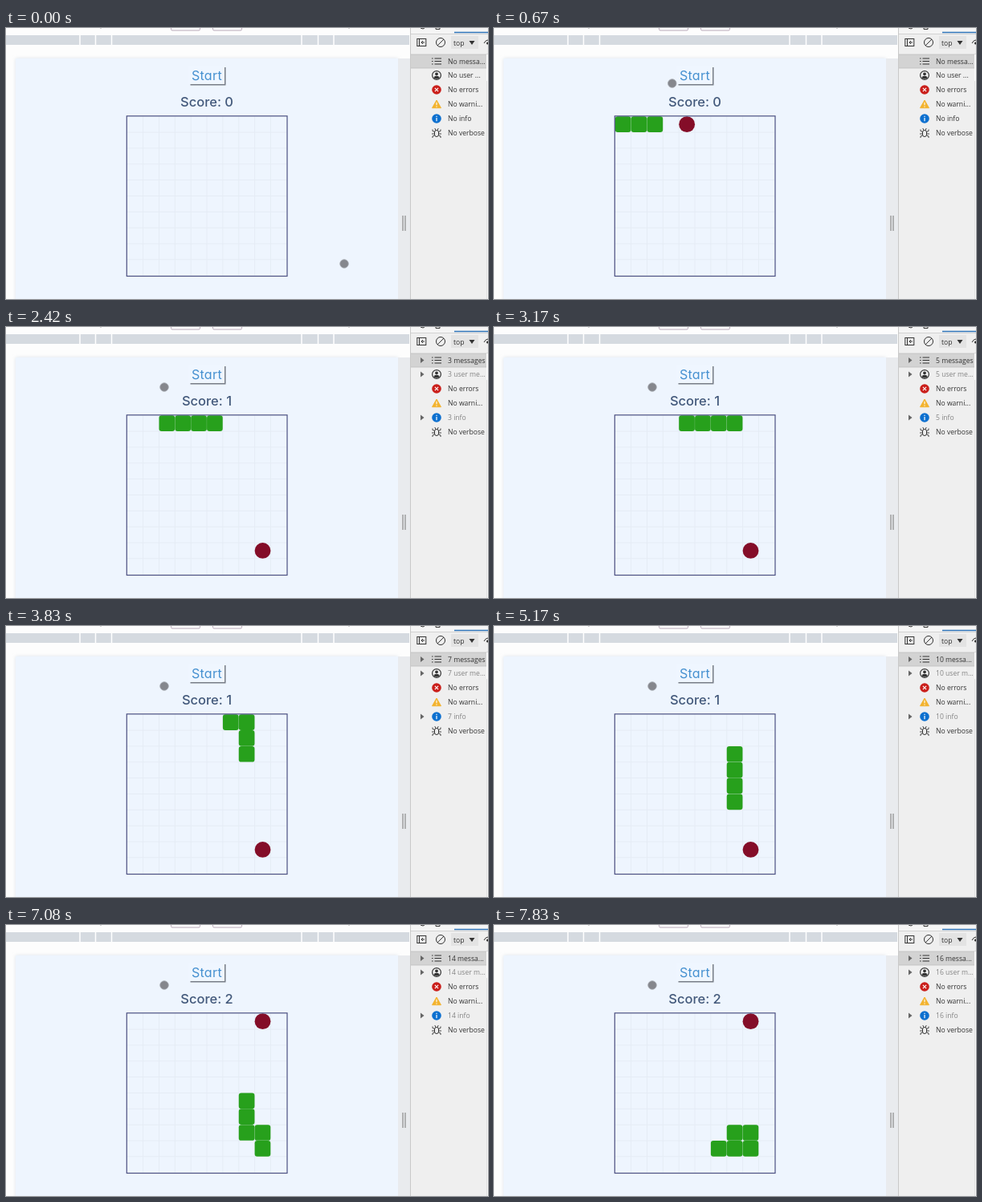
An HTML page for the animation above (8 s loop, 600x338 px).

```html
<!DOCTYPE html>
<html lang="en">
<head>
<meta charset="utf-8">
<title>Snake</title>
<style>
  html, body { margin: 0; width: 100%; height: 100%; overflow: hidden; background: #fff; }
  svg { display: block; width: 600px; height: 338px; }
  .game { font-family: Inter, "Open Sans", sans-serif; font-feature-settings: "cv11"; text-anchor: middle; }
  .panel { font: 8.6px "Open Sans", "Noto Sans", sans-serif; fill: #333; }
  .line { fill: none; stroke: #333; }
</style>
</head>
<body>
<svg viewBox="0 0 600 338">
  <defs>
    <filter id="soft" x="-10%" y="-10%" width="120%" height="120%"><feGaussianBlur stdDeviation="2"/></filter>
    <filter id="edge" x="-10%" y="-10%" width="120%" height="130%"><feGaussianBlur stdDeviation=".6"/></filter>
  </defs>

  <rect width="600" height="338" fill="#fdfdfd"/>
  <rect y="9" width="502" height="12" fill="#d5dae0"/>
  <path d="M92 9v12M111.5 9v12M131.5 9v12M368 9v12M388.500 9v12M408 9v12" stroke="#fff" stroke-width="1.5"/>
  <path d="M205.500 0v1.500q0 1.500 1.500 1.500h33q1.500 0 1.500-1.500v-1.500M257.500 0v1.500q0 1.500 1.500 1.500h33q1.500 0 1.500-1.500v-1.500" fill="none" stroke="#b9a9b9"/>
  <path d="M117 0h2M426 0h2" stroke="#aaa"/>

  <rect x="12" y="38" width="476" height="304" fill="#dde3ea" filter="url(#soft)"/>
  <rect x="12" y="38" width="476" height="300" fill="#eef5fe"/>
  <rect x="488" y="38" width="15" height="300" fill="#e9ebee"/>
  <path d="M494 234v19M497 234v19" stroke="#8b8b8b" stroke-width="1.2"/>

  <g class="game">
    <rect x="229.500" y="49" width="44" height="22.500" fill="#777d86" filter="url(#edge)"/>
    <rect x="227.500" y="47" width="44.500" height="23" fill="#eff6ff"/>
    <text x="250" y="64.500" font-size="16" letter-spacing=".3" fill="#4590d0">Start</text>
    <text id="score" x="250" y="98" font-size="16.500" font-weight="500" fill="#43597b"></text>
  </g>
  <path id="grid" fill="none" stroke="#e5ecf5"/>
  <g id="snake" fill="#27a01c"></g>
  <circle id="food" r="9.900" fill="#840d28"/>
  <rect x="150.300" y="109.800" width="199.700" height="199.700" fill="none" stroke="#4c5080" stroke-width="1.200"/>
  <circle id="cursor" r="5.300" fill="#85878d" stroke="#a5a9b0" stroke-width=".8"/>

  <g class="panel">
    <rect x="503" width="97" height="338" fill="#efefef"/>
    <path d="M503.500 0v338" stroke="#c9c9c9"/>
    <rect x="504" width="96" height="7" fill="#f5f5f5"/>
    <path d="M504 7.500h96" stroke="#d2d2d2"/>
    <path d="M558 5.500h42" stroke="#2f73b8" stroke-width="1.500"/>
    <path d="M516 0l3 1 2-1M535 0v1.500h5v-1.500" class="line"/>
    <rect x="504" y="33" width="94" height="17" fill="#d3d3d3"/>
    <path d="M504 33h96M504 50h94" stroke="#bdbdbd" stroke-width=".8"/>
    <rect x="598" y="33" width="2" height="305" fill="#fafafa"/>
    <path d="M598.500 66v272" stroke="#d5d5d5" stroke-width=".7"/>

    <rect x="511.800" y="13.500" width="11" height="9" class="line"/>
    <path d="M514.500 13.500v9M521 18h-4M519 16l-2 2 2 2" class="line"/>
    <circle cx="541" cy="18" r="5.500" class="line"/><path d="M537 22l8-8" class="line"/>
    <rect x="554" y="10" width="34" height="16" fill="#e3e3e3"/>
    <text x="557" y="21.500">top</text>
    <path d="M576.500 16h7l-3.500 5z"/>
    <path d="M595 19q2-4 5-4" class="line"/><circle cx="599.500" cy="19" r="1.500"/>

    <path d="M533.500 38h8.500M533.500 41.500h8.500M533.500 45h8.500" class="line"/>
    <path d="M530 38h1.500M530 41.500h1.500M530 45h1.500" class="line"/>
    <circle cx="536" cy="59" r="5.400" class="line" stroke-width="1.200"/>
    <circle cx="536" cy="57.300" r="1.900"/><path d="M532.500 62.500q0-2.700 3.500-2.700t3.500 2.700q-3.500 2-7 0z"/>
    <circle cx="536" cy="77" r="5.800" fill="#ca1f1b"/>
    <path d="M533.900 74.900l4.200 4.200M538.100 74.900l-4.200 4.200" stroke="#fff" stroke-width="1.200"/>
    <path d="M536 90l5.500 9.700h-11z" fill="#f3b32e" stroke="#f3b32e" stroke-linejoin="round"/>
    <path d="M536 92.800v3.500M536 97.500v1.200" stroke="#fff" stroke-width="1.100"/>
    <circle cx="536" cy="113" r="5.800" fill="#0d70cf"/>
    <path d="M536 109.700v1.300M536 112v4.300" stroke="#fff" stroke-width="1.200"/>
    <rect x="533.500" y="127.500" width="5" height="8" rx="2.500" class="line"/>
    <path d="M534.500 127.500v-1.500l-1-1M537.500 127.500v-1.500l1-1M533.500 129.500l-2.500-1v-2M538.500 129.500l2.500-1v-2M533 132h-3M539 132h3M533.500 134l-2.500 1v2M538.500 134l2.500 1v2" class="line" stroke-width=".9"/>

    <path id="arrows" d="M516 38l4.500 3.500-4.500 3.500zM516 55.500l4.500 3.500-4.500 3.500zM516 109.500l4.500 3.500-4.500 3.500z" fill="#666"/>
    <text id="messages" x="550" y="44.700"></text>
    <text id="user" x="550" y="62.300"></text>
    <text x="550" y="80.300">No errors</text>
    <text x="550" y="98.300">No warni...</text>
    <text id="info" x="550" y="116.300"></text>
    <text x="550" y="134.300">No verbose</text>
  </g>
</svg>
<script>
const LOOP = 8000, START = 500;
const CELL = 19.85, LEFT = 150.8, TOP = 110.2;
const TURNS = 'RRRRRDDDDDDDRDLL';
const STEP_TIMES = [1165, 1660, 2080, 2498, 2915, 3415, 3825, 4330, 4745, 5165, 5610, 6075, 6580, 6990, 7415, 7815];
const MEALS = [2, 14];
const FOODS = [[4, 0], [8, 8], [8, 0]];
const MOUSE = [[60, 421, 294], [160, 395, 250], [330, 275, 80], [410, 247, 60], [560, 244, 61], [670, 222, 69], [750, 205, 73], [830, 197, 75]];

const $ = id => document.getElementById(id);
const setText = (id, text) => { $(id).textContent = text; };

const trail = [[0, 0], [1, 0], [2, 0]];
for (const turn of TURNS) {
  const [x, y] = trail[trail.length - 1];
  const [dx, dy] = { R: [1, 0], D: [0, 1], L: [-1, 0] }[turn];
  trail.push([x + dx, y + dy]);
}

let gridPath = '';
for (let i = 1; i < 10; i++) {
  gridPath += `M${LEFT + i * CELL} ${TOP}v198.500M${LEFT} ${TOP + i * CELL}h198.500`;
}
$('grid').setAttribute('d', gridPath);

function mouseAt(t) {
  const next = MOUSE.findIndex(point => point[0] > t);
  if (next < 0) return MOUSE[MOUSE.length - 1].slice(1);
  if (next === 0) return MOUSE[0].slice(1);
  const [t0, x0, y0] = MOUSE[next - 1], [t1, x1, y1] = MOUSE[next];
  const k = (t - t0) / (t1 - t0);
  return [x0 + (x1 - x0) * k, y0 + (y1 - y0) * k];
}

function place(id, x, y) {
  $(id).setAttribute('cx', x);
  $(id).setAttribute('cy', y);
}

function showLog(count) {
  const wide = count > 9;
  setText('messages', !count ? 'No messa...' : wide ? `${count} messa...` : `${count} message${count > 1 ? 's' : ''}`);
  setText('user', !count ? 'No user ...' : `${count} user m${wide ? '' : 'e'}...`);
  setText('info', `${count || 'No'} info`);
  $('arrows').style.display = count ? '' : 'none';
  for (const id of ['user', 'info']) $(id).style.fill = count ? '#858585' : '#333';
}

function draw(t) {
  const steps = STEP_TIMES.filter(time => time <= t).length;
  const score = MEALS.filter(meal => meal <= steps).length;
  const playing = t >= START;
  const end = steps + 3;
  const body = playing ? trail.slice(end - 3 - score, end) : [];

  $('snake').innerHTML = body.map(([x, y]) =>
    `<rect x="${LEFT + x * CELL}" y="${TOP + y * CELL}" width="19.700" height="19.700" rx="3.200"/>`).join('');
  const [fx, fy] = FOODS[score];
  place('food', LEFT + (fx + 0.5) * CELL, TOP + (fy + 0.5) * CELL);
  $('food').style.display = playing ? '' : 'none';
  place('cursor', ...mouseAt(t));
  setText('score', `Score: ${score}`);
  showLog(steps);
}

function tick() {
  draw(performance.now() % LOOP);
  requestAnimationFrame(tick);
}
tick();
</script>
</body>
</html>
```
